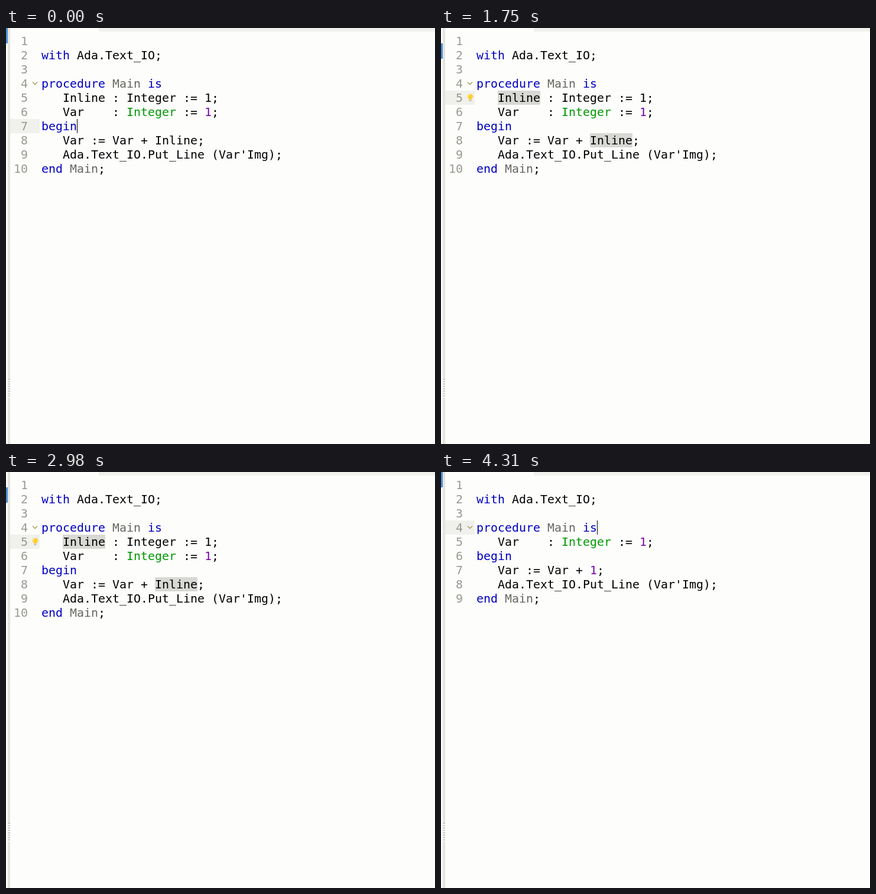
An HTML page that plays this animation: 726 by 704 pixels, repeating every 4.52 s.

```html
<!DOCTYPE html>
<html lang="en">
<head>
<meta charset="utf-8">
<title>Inline variable refactoring</title>
<style>
  html, body { margin: 0; width: 100%; height: 100%; overflow: hidden; background: #fdfdfc; }
  #stage { position: relative; width: 726px; height: 704px; overflow: hidden; background: #fdfdfc; }
  #stage * { box-sizing: border-box; }
  .abs, pre, .box { position: absolute; }
  pre { margin: 0; left: 60px; font: 19.94px/24px "DejaVu Sans Mono", monospace; color: #000; }
  .nums { left: 7px; top: 10px; width: 30px; text-align: right; color: #999990; }
  b { font-weight: normal; color: #0000c0; }
  i { font-style: normal; color: #666660; }
  u { text-decoration: none; color: #009900; }
  s { text-decoration: none; color: #7700aa; }

  .tabs { left: 157px; top: 0; width: 569px; height: 6px; background: #f0f0ec; }
  .edge { left: 3px; top: 0; width: 4px; height: 704px; background: #e4e4dc; }
  .grip { left: 4px; top: 594px; width: 3px; height: 32px;
    background: repeating-linear-gradient(#aaaaa4 0 1px, #f4f4f0 1px 4px); }
  .thumb { left: 0; top: 0; width: 3px; height: 26px; background: #4a90d9; }
  .row { left: 7px; top: 0; width: 50px; height: 24px; background: #f0f0ec; }
  .occ { width: 72px; height: 24px; background: #d8d8d4; }
  .caret { left: 0; top: 0; width: 1px; height: 24px; background: #000; }

  .menu { left: 49px; top: 112px; width: 375px; height: 132px; padding: 3px 0;
    border: 1px solid #dcdcd8; border-bottom-color: #c0c0bc; border-radius: 4px;
    background: #fdfdfc; font: 18.33px/31px "DejaVu Sans", sans-serif; color: #2e3430; }
  .menu div { position: relative; height: 31px; padding-left: 50px; white-space: pre; }
  .menu .head { padding-left: 31px; font-weight: bold; color: #8e9088; }
  .menu svg { position: absolute; left: 33px; top: 7px; width: 13px; height: 16px; }

  /* All parts switch state in hard steps on one shared clock. */
  .anim { animation: 4.52s step-end infinite; }
  .caret { animation-name: caret; }
  .row { animation-name: row; }
  .thumb { animation-name: thumb; }
  .before { animation-name: before; }
  .after { animation-name: after; }
  .occ { animation-name: occ; }
  .hint { animation-name: hint; }
  .menu { animation-name: menu; }
  .pick { animation-name: pick; }

  @keyframes caret {
    0%, 20.35% { transform: translate(120px, 154px); opacity: 1; }
    11.28% { transform: translate(120px, 154px); opacity: 0; }
    25% { transform: translate(144px, 106px); opacity: 1; }
    38.71% { transform: translate(144px, 106px); opacity: 0; }
    68.14%, 86.28%, 100% { transform: translate(264px, 82px); opacity: 1; }
    77.21% { transform: translate(264px, 82px); opacity: 0; }
  }
  @keyframes row {
    0% { transform: translateY(154px); }
    25% { transform: translateY(106px); }
    68.14%, 100% { transform: translateY(82px); }
  }
  @keyframes thumb {
    0%, 95.35%, 100% { transform: none; }
    27.21% { transform: translateY(26px); }
  }
  @keyframes before { 0% { opacity: 1; } 68.14%, 100% { opacity: 0; } }
  @keyframes after { 0% { opacity: 0; } 68.14%, 100% { opacity: 1; } }
  @keyframes occ { 0%, 68.14%, 100% { opacity: 0; } 27.21% { opacity: 1; } }
  @keyframes hint { 0%, 68.14%, 100% { opacity: 0; } 29.42% { opacity: 1; } }
  @keyframes menu { 0%, 65.92%, 100% { opacity: 0; } 47.78% { opacity: 1; } }
  @keyframes pick {
    0%, 65.92%, 100% { background: transparent; color: #2e3430; }
    59.07% { background: #4a90d9; color: #fff; }
  }
</style>
</head>
<body>
<div id="stage">
  <svg width="0" height="0" class="abs">
    <symbol id="bulb" viewBox="0 0 13 16">
      <path d="M6.5 .5C3 .5 .8 2.8 .8 5.6C.8 8 3.3 9 3.7 11.5H9.3C9.7 9 12.2 8 12.2 5.6C12.2 2.8 10 .5 6.5 .5Z" fill="#fccf35"/>
      <path d="M4 2.5Q2.4 3.6 2.5 5.8" fill="none" stroke="#fff3b0" stroke-width="1.3"/>
      <path d="M4 12H9V14.3L7.5 15.5H5.5L4 14.3Z" fill="#c4c0b0"/>
    </symbol>
  </svg>

  <div class="box tabs"></div>
  <div class="box edge"></div>
  <div class="box grip"></div>
  <div class="box thumb anim"></div>
  <div class="box row anim"></div>
  <div class="box occ anim" style="left:96px;top:106px"></div>
  <div class="box occ anim" style="left:252px;top:178px"></div>

  <pre class="nums">1
2
3
4
5
6
7
8
9</pre>
  <pre class="nums before anim" style="top:226px">10</pre>
  <svg class="abs" style="left:44px;top:90px" width="10" height="8">
    <path d="M1 1.5L5 5.5L9 1.5" fill="none" stroke="#a0a058" stroke-width="1.5"/>
  </svg>
  <svg class="abs hint anim" style="left:44px;top:111px" width="11" height="14"><use href="#bulb"/></svg>

  <pre style="top:34px"><b>with</b> Ada.Text_IO;

<b>procedure</b> <i>Main</i> <b>is</b></pre>
  <pre class="before anim" style="top:106px">   Inline : Integer := 1;
   Var    : <u>Integer</u> := <s>1</s>;
<b>begin</b>
   Var := Var + Inline;
   Ada.Text_IO.Put_Line (Var'Img);
<b>end</b> <i>Main</i>;</pre>
  <pre class="after anim" style="top:106px">   Var    : <u>Integer</u> := <s>1</s>;
<b>begin</b>
   Var := Var + <s>1</s>;
   Ada.Text_IO.Put_Line (Var'Img);
<b>end</b> <i>Main</i>;</pre>
  <div class="box caret anim"></div>

  <div class="box menu anim">
    <div class="head">Refactoring</div>
    <div class="pick anim"><svg><use href="#bulb"/></svg>Inline variable</div>
    <div><svg><use href="#bulb"/></svg>Introduce Parameter</div>
    <div><svg><use href="#bulb"/></svg>Delete Entity and all references</div>
  </div>
</div>
</body>
</html>
```
